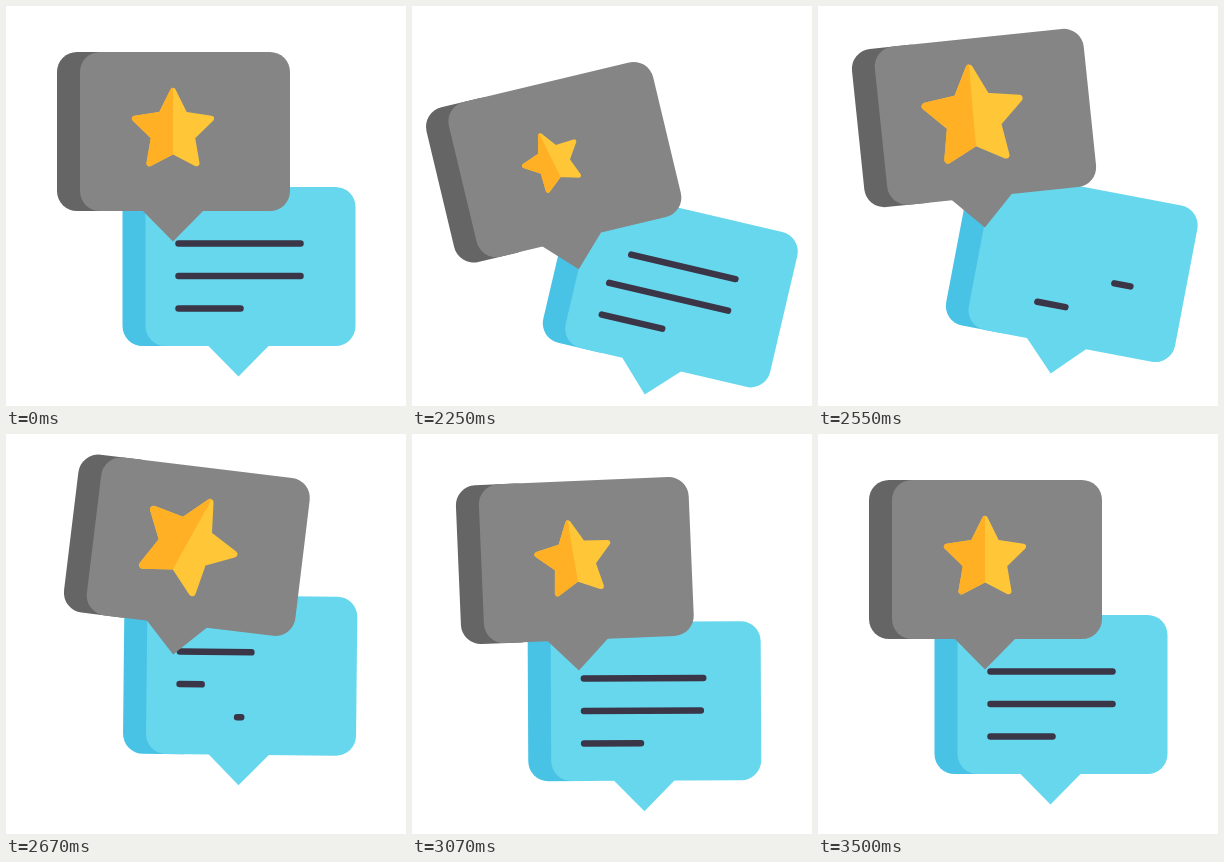
Animation, 400 px wide and 400 px high, one loop 3520 ms. Source, as an HTML page:

```html
<!DOCTYPE html>
<html>
<head>
<meta charset="utf-8">
<style>
  html, body { margin: 0; width: 100%; height: 100%; overflow: hidden; background: #fff; }
  svg { display: block; width: 100%; height: 100%; }
</style>
</head>
<body>
<svg viewBox="0 0 400 400">
  <defs>
    <!-- Bubble shapes have their origin at the tip -->
    <rect id="side" x="-116" y="-190.5" width="80" height="159" rx="20"/>
    <g id="front">
      <rect x="-93" y="-190.5" width="210" height="159" rx="20"/>
      <path d="M-31-32.5H31L0-1Z"/>
    </g>
    <path id="starShape" stroke-width="6" stroke-linejoin="round"/>
    <clipPath id="leftHalf"><rect x="-50" y="-50" width="50" height="100"/></clipPath>
  </defs>
  <g id="reply">
    <use href="#side" fill="#48c3e5"/>
    <use href="#front" fill="#67d7ed"/>
    <g id="lines" stroke="#3a3547" stroke-width="6.5" stroke-linecap="round">
      <line y1="-134" y2="-134"/>
      <line y1="-101.5" y2="-101.5"/>
      <line y1="-69" y2="-69"/>
    </g>
  </g>
  <g id="review">
    <use href="#side" fill="#656565"/>
    <use href="#front" fill="#858585"/>
    <g id="star">
      <use href="#starShape" fill="#ffc738" stroke="#ffc738"/>
      <g clip-path="url(#leftHalf)"><use href="#starShape" fill="#ffb024" stroke="#ffb024"/></g>
    </g>
  </g>
</svg>
<script>
const LOOP = 3520, REST = 2020, START = 1990, END = 3500;
const DAMPING = -0.35;
const ERASE_START = 2162, ERASE = 390, STAGGER = 92, DRAW_TAU = 135, LINE_LEFT = -60;

const $ = id => document.getElementById(id);
const ease = u => (1 - Math.cos(Math.PI * Math.min(1, Math.max(0, u)))) / 2;
const tween = (t, t0, t1, from, to) => from + (to - from) * ease((t - t0) / (t1 - t0));

// Wind up to `dip`, wait until `release`, swing to `rebound`, swing back damped, settle at 0
function swing(t, dip, rebound, release, beat) {
  const back = rebound * DAMPING, top = release + beat, low = top + beat;
  if (t < release) return tween(t, START, START + (release - START) * 0.75, 0, dip);
  if (t < top) return tween(t, release, top, dip, rebound);
  if (t < low) return tween(t, top, low, rebound, back);
  return tween(t, low, Math.min(END, low + beat * 1.2), back, 0);
}

function place(id, x, y, turn, size = 1) {
  $(id).setAttribute("transform", `translate(${x} ${y}) rotate(${turn}) scale(${size})`);
}

// Each line is wiped away from the left, then drawn again from the left
function drawLine(line, i, t) {
  const age = t - ERASE_START - i * STAGGER, length = i < 2 ? 122 : 62;
  let from = 0, to = 1;
  if (age < ERASE) from = ease(age / ERASE);
  else if (t < END) to = 1 - Math.exp((ERASE - age) / DRAW_TAU);
  line.setAttribute("x1", LINE_LEFT + length * from);
  line.setAttribute("x2", LINE_LEFT + length * to);
  line.style.visibility = (to - from) * length < 0.5 ? "hidden" : "visible";
}

function render(now) {
  const time = now % LOOP, t = time < REST ? 0 : time;
  place("review", 167, 236.5 + swing(t, 28, -19.5, 2360, 245), swing(t, -15, 8, 2430, 280));
  place("star", 0, -111.5, swing(t, -14, 24, 2430, 280), 1 + swing(t, -0.27, 0.25, 2250, 340));
  place("reply", 232.5, 371.5 + swing(t, 18, -22, 2355, 380), swing(t, 15, -7, 2440, 385));
  [...$("lines").children].forEach((line, i) => drawLine(line, i, t));
}

const points = Array.from({ length: 10 }, (_, i) => {
  const radius = i % 2 ? 20 : 40, angle = i * Math.PI / 5;
  return [radius * Math.sin(angle), -radius * Math.cos(angle)];
});
$("starShape").setAttribute("d", "M" + points.join("L") + "Z");

const begin = performance.now();
function tick() {
  render(performance.now() - begin);
  requestAnimationFrame(tick);
}
tick();
</script>
</body>
</html>
```
